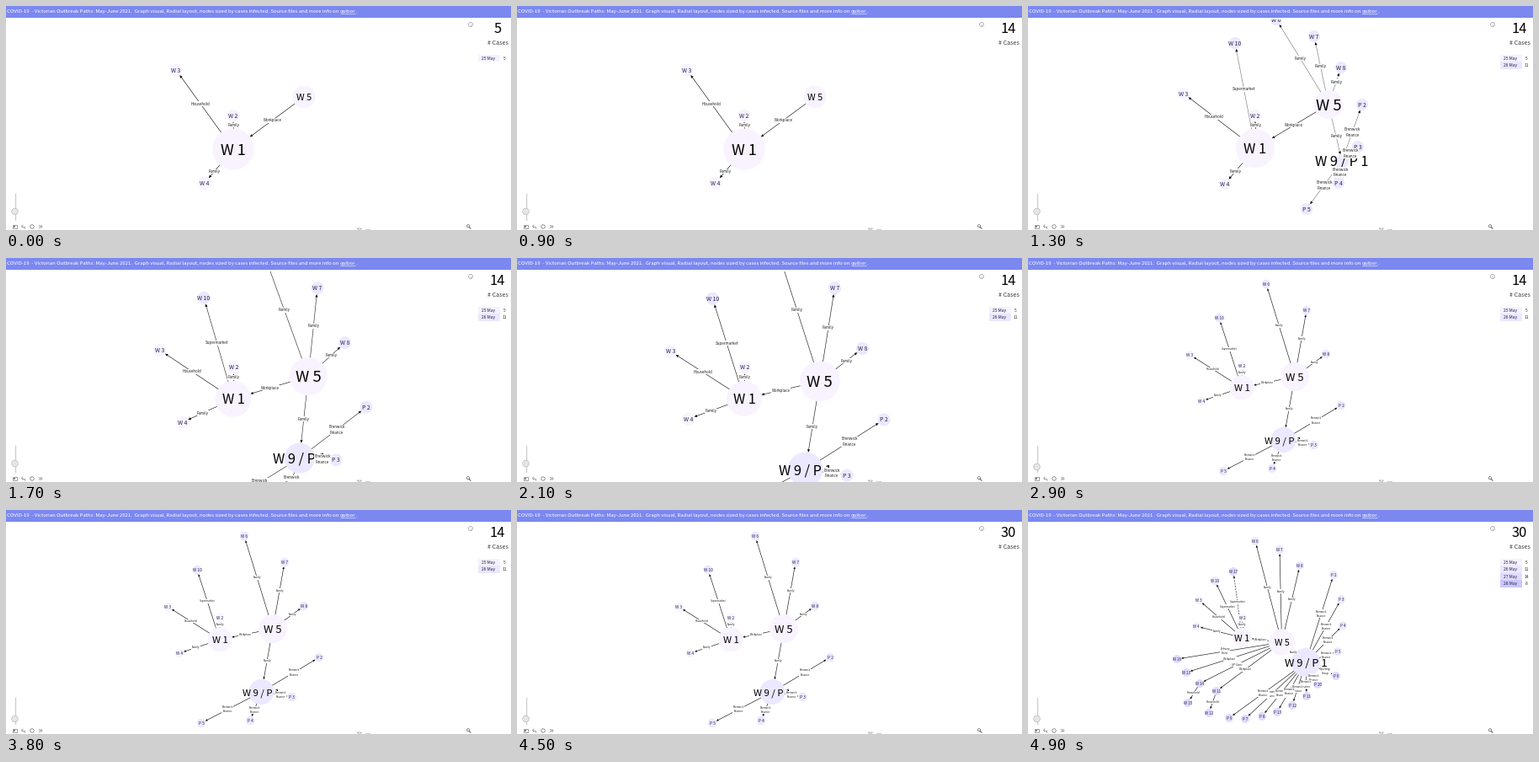
A matplotlib script for the animation above (5 s loop, 600 px wide and 266 px high).

```python
import numpy as np
import matplotlib.pyplot as plt
from matplotlib.animation import FuncAnimation
from matplotlib.patches import Circle, Polygon, Rectangle

plt.rcParams["font.family"] = "Noto Sans CJK JP"

W, H, DPI = 600, 266, 100
PX = 72 / DPI  # points per pixel
PIVOT = np.array([216.7, 123.7])
ZOOM = 1 / 0.7
TINTS = ["#f8f3ff", "#ece8ff", "#e0dbfd"]
CHIPS = ["#f5f1ff", "#ebe7ff", "#e0dcff", "#cbc7fa"]
ROWS = [("25 May", 5), ("26 May", 11), ("27 May", 14), ("28 May", 8)]
GREY = "#8a8a8a"
FIRM = "Brenwick\nFinance"
TITLE = ("COVID-19  - Victorian Outbreak Paths: May-June 2021.  Graph visual, "
         "Radial layout, nodes sized by cases infected. "
         "Source files and more info on")


def nodes(radius, size, **spots):
    """Node name -> array of x, y, radius, text size."""
    return {n: np.array(s if len(s) == 4 else (*s, radius, size), float)
            for n, s in spots.items()}


FIRST = nodes(7.5, 6.9, W1=(270, 170, 24.5, 18), W2=(270, 130), W3=(202, 76),
              W4=(236, 210), W5=(354, 108, 13.5, 11))

START = nodes(7, 6.9, W1=(270, 169, 23, 16.4), W2=(270, 130), W3=(185, 104),
              W4=(234, 211), W5=(357, 117, 17, 18.5), W6=(295, 16),
              W7=(340, 36), W8=(372, 73), W9=(373, 184, 8, 16.3),
              W10=(246, 44), P2=(397, 117), P3=(392, 167), P4=(369, 210),
              P5=(331, 241))

SETTLED = nodes(5.3, 4.8, W1=(254, 154, 14.5, 11.4), W2=(254.5, 128),
                W3=(192.5, 115), W4=(206, 170), W5=(317, 141, 17, 13),
                W6=(283, 31), W7=(331, 62), W8=(354, 114),
                W9=(303.5, 216, 15, 11.4), W10=(227, 71), P2=(372, 175),
                P3=(339.5, 222), P4=(290, 250), P5=(232, 253))

FULL = nodes(5, 4.5, W1=(254.5, 151.5, 11.5, 11), W2=(254.5, 128),
             W3=(203, 107), W4=(200, 138), W5=(301.5, 157, 15.5, 10.8),
             W6=(270, 37), W7=(299, 47), W8=(323, 66),
             W9=(330, 181, 17, 13), W10=(222, 84), W11=(224, 215),
             W12=(215, 241), W13=(188, 193), W14=(204, 206), W15=(190, 229),
             W16=(177, 177), W17=(244, 73), P2=(363, 77), P3=(372, 106),
             P4=(374, 137), P5=(368, 168), P6=(366, 197), P7=(258, 248),
             P8=(278, 245), P9=(239, 247), P10=(344, 207), P11=(331, 221),
             P12=(314, 232), P13=(296, 240))

EDGES = [("W1", "W2", "Family"), ("W1", "W3", "Household"),
         ("W1", "W4", "Family"), ("W5", "W1", "Workplace"),
         ("W1", "W10", "Supermarket"), ("W1", "W17", "Supermarket"),
         ("W5", "W16", "Delivery\nDriver"), ("W5", "W13", "Workplace"),
         ("W5", "W14", "GP Clinic"), ("W5", "W11", "Workplace"),
         ("W14", "W15", "Household"), ("W11", "W12", "Household"),
         ("W9", "P6", "Sporting\nGroup")]
EDGES += [("W5", f"W{n}", "Family") for n in (6, 7, 8, 9)]
EDGES += [("W9", f"P{n}", FIRM) for n in range(2, 14) if n != 6]
PARENT = {dst: src for src, dst, _ in EDGES}

# New nodes emerge halfway along their edge.
SEED = {n: SETTLED[n] if n in SETTLED else (FULL[n] + FULL[PARENT[n]]) / 2
        for n in FULL}
for n in SEED:
    if n not in SETTLED:
        SEED[n][2:] = FULL[n][2:]


def scaled(layout, z):
    return {n: np.append(PIVOT + (v[:2] - PIVOT) * z, v[2:] * z)
            for n, v in layout.items()}


def blend(a, b, k):
    return {n: b[n] + (a[n] - b[n]) * k for n in b}


def pose(i):
    """Layout, zoom and remaining distance to rest at step i."""
    z = 1 + (ZOOM - 1) * np.clip((29 - i) / 3, 0, 1)
    if i < 12:
        return FIRST, z, 0
    if i < 27:
        k = 0.25 ** ((i - 13) / 4)
        return blend(START, scaled(SETTLED, ZOOM), k), z, k
    if i < 47:
        return scaled(SETTLED, z), z, 0
    k = 0.35 * (49 - i)
    return blend(SEED, FULL, k), z, k


fig = plt.figure(figsize=(W / DPI, H / DPI), dpi=DPI, facecolor="white")
ax = fig.add_axes([0, 0, 1, 1])


def text(x, y, s, size, color="black", ha="center", z=3):
    """Text whose capitals are centred on y."""
    return ax.text(x, y + 0.366 * size, s, fontsize=size * PX, color=color,
                   ha=ha, va="baseline", zorder=z)


def line(xs, ys, color=GREY, lw=0.6, z=8, **kw):
    ax.plot(xs, ys, color=color, lw=lw * PX, zorder=z, **kw)


def box(x, y, w, h, fc, z=8, ec="none"):
    ax.add_patch(Rectangle((x, y), w, h, fc=fc, ec=ec, lw=0.6 * PX, zorder=z))


def disc(x, y, r, fc, z=2, ec="none"):
    ax.add_patch(Circle((x, y), r, fc=fc, ec=ec, lw=0.6 * PX, zorder=z))


def edge(a, b, label, z, alpha, dashed):
    d = b[:2] - a[:2]
    dist = np.hypot(*d)
    d = d / dist
    tail = a[:2] + d * a[2]
    tip = a[:2] + d * max(dist - b[2], a[2])
    head = 2.8 + 1.6 * (z - 1)
    base = tip - d * head
    side = np.array([-d[1], d[0]]) * head * 0.45
    line(*zip(tail, base), "#1c1c1c", 0.65, 1, alpha=alpha,
         ls=(0, (3, 2)) if dashed else "-")
    ax.add_patch(Polygon([tip, base + side, base - side], fc="black",
                         ec="none", zorder=2.5))
    x, y = (tail + tip) / 2
    ax.text(x, y, label, fontsize=3.12 * z * PX, color="#1c1c1c",
            ha="center", va="center", linespacing=1.35, zorder=4,
            bbox=dict(fc="white", ec="none", pad=0.3))


def graph(i):
    layout, z, k = pose(i)
    for src, dst, label in EDGES:
        if dst in layout:
            alpha = 1 if dst in FIRST else 1 - 0.45 * min(k, 1)
            edge(layout[src], layout[dst], label, z, alpha, dst == "W17")
    for n, (x, y, r, size) in layout.items():
        disc(x, y, r, TINTS[(n not in FIRST) + (n not in SETTLED)])
        name = "W 9 / P 1" if n == "W9" else f"{n[0]} {n[1:]}"
        text(x, y, name, size, "black" if size > 8 else "#25254f")
    return z


def header():
    box(0, 13, W, 3, "white", 5)
    box(0, 0, W, 13.5, "#7b88f0", 6)
    t = text(1, 5.8, TITLE, 6, "white", "left", 7)
    x = t.get_window_extent().x1 + 1.4
    link = text(x, 5.8, "quibor", 6, "white", "left", 7)
    end = link.get_window_extent().x1
    line([x, end], [9, 9], "white", 0.5)
    text(end + 0.2, 5.8, ".", 6, "white", "left", 7)


def panel(i):
    total = 5 if i < 9 else 14 if i < 43 else 30
    shown = 1 if i < 9 else 0 if i < 12 else 2 if i < 43 else 0 if i < 47 else 4
    text(584, 26, total, 16.5)
    text(584, 43, "# Cases", 7.2, "#3c3c3c")
    for j, (day, cases) in enumerate(ROWS[:shown]):
        y = 62 + 8.5 * j
        box(561, y - 4.2, 25.5, 8.4, CHIPS[j], 2)
        text(573, y, day, 5, "#25254f")
        text(592, y, cases, 5, "#333333")
    disc(552, 22, 2.5, "white", 8, GREY)
    line([552, 552], [21.6, 23.4])
    line([552, 552], [20.5, 20.9])


def controls(z):
    line([10.5, 10.5], [223, 254], "#cfcfcf", 1.4)
    disc(10.5, 248 - 4 * (z - 1) / (ZOOM - 1), 3.8, "#e6e6e6", 9, "#b5b5b5")
    box(7.5, 260, 5, 4, "white", 8, "#666666")
    disc(10, 262, 1, "#666666", 9)
    line([22, 22, 18.5], [264, 261.5, 261.5], "#666666")
    line([20, 18.5, 20], [260, 261.5, 263], "#666666")
    disc(31, 262, 2.2, "white", 8, "#555555")
    for x in (39.5, 41.5):
        line([x, x + 1.6, x], [260.4, 262, 263.6], "#666666")
    line([417.5, 422.5, 420, 417.5], [264, 264, 266.5, 264], "#999999")
    for x in (427, 430):
        box(x, 264.5, 2, 3, "white", 8, "#aaaaaa")
    disc(549, 261.3, 1.6, "white", 8, "#444444")
    line([550.2, 552], [262.5, 264.3], "#444444", 0.9)


def draw(i):
    ax.clear()
    ax.set(xlim=(0, W), ylim=(H, 0))
    ax.set_axis_off()
    z = graph(i)
    header()
    panel(i)
    controls(z)
    return []


anim = FuncAnimation(fig, draw, frames=50, interval=100, repeat=True,
                     repeat_delay=0, init_func=lambda: draw(0))
plt.show()
```
